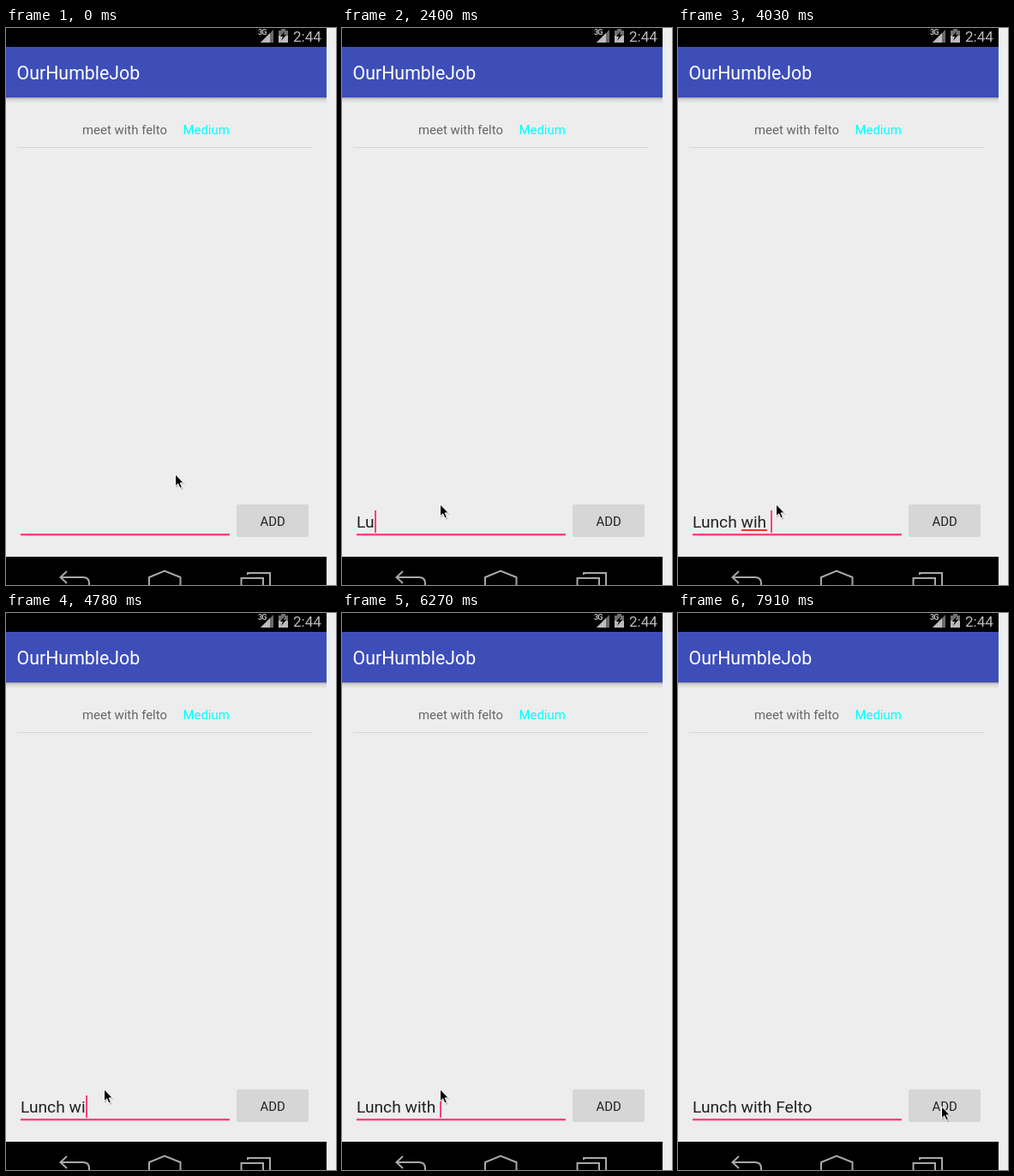
An HTML page that plays this animation: 385x650 px, repeating every 8000 ms.

```html
<!DOCTYPE html>
<html lang="en">
<head>
<meta charset="utf-8">
<title>To-do list</title>
<style>
  html, body { margin: 0; width: 100%; height: 100%; overflow: hidden; background: #efefef; }
  svg { display: block; width: 385px; height: 650px; }
  text { font-family: Roboto, sans-serif; white-space: pre; }
  .item { font-size: 14.93px; }
  .nav { fill: none; stroke: #a8a8a8; stroke-width: 2; }
</style>
</head>
<body>
<svg viewBox="0 0 385 650">
  <defs>
    <linearGradient id="shade" x1="0" y1="0" x2="0" y2="1">
      <stop offset="0" stop-color="#000" stop-opacity=".3"/>
      <stop offset=".35" stop-color="#000" stop-opacity=".1"/>
      <stop offset="1" stop-color="#000" stop-opacity="0"/>
    </linearGradient>
  </defs>

  <rect width="374" height="650" fill="#ededed"/>

  <!-- Status bar -->
  <rect width="374" height="22" fill="#000"/>
  <text x="294" y="8" font-size="9" font-weight="700" fill="#b8b8b8" letter-spacing="-.8">3G</text>
  <path d="M312 2V17H297Z" fill="#686868"/>
  <path d="M308 6V17H297Z" fill="#bcbcbc"/>
  <path d="M321 1h5v2h3v7h-11V3h3Z" fill="#707070"/>
  <path d="M318 9h11v8h-11Z" fill="#bcbcbc"/>
  <path d="M325 4l-5 6h3l-2 5 6-7h-3Z" fill="#000"/>
  <text x="335" y="16" font-size="17.07" fill="#bcbcbc">2:44</text>

  <!-- App bar -->
  <rect y="22" width="374" height="59" fill="#3e4eb8"/>
  <rect y="81" width="374" height="7" fill="url(#shade)"/>
  <text x="12.5" y="60" font-size="21.33" fill="#fff">OurHumbleJob</text>

  <!-- List -->
  <text class="item" x="89" y="124" fill="#666">meet with felto</text>
  <text class="item" x="206.5" y="124" fill="#0ff">Medium</text>
  <rect x="13" y="139" width="344" height="1" fill="#d5d5d5"/>

  <!-- Entry row -->
  <rect x="17" y="590" width="244" height="2.4" fill="#ff4081"/>
  <text id="entry" x="17" y="583" font-size="19.2" fill="#212121"></text>
  <rect id="typo" x="74" y="585" width="30" height="2" fill="#e8392f"/>
  <rect id="caret" y="563" width="2" height="26" fill="#ff4081"/>
  <rect x="269" y="556" width="84" height="38" rx="2" fill="#d6d6d6"/>
  <text class="item" x="296.5" y="580.5" fill="#212121">ADD</text>

  <!-- Navigation bar -->
  <rect y="617" width="374" height="33" fill="#000"/>
  <path class="nav" d="M71 634L63.500 641L71 648M64 641H90Q97 641 97 648V651"/>
  <path class="nav" d="M167 651V641L185 633.500L203.500 641V651"/>
  <path class="nav" d="M274.500 651V642H300V651M282 636H308V651M282 635V638"/>

  <g id="pointer">
    <path d="M1 2V17L4.600 13.700L7 19L9.800 17.800L7.500 12.600H12Z" fill="#000" opacity=".18"/>
    <path d="M.5 .8V14.800L3.700 11.800L6 17L8.400 16L6.100 10.900H10.300Z" fill="#000" stroke="#fff" stroke-width="1"/>
  </g>
</svg>
<script>
const LOOP = 8000;
const $ = id => document.getElementById(id);
const entry = $('entry'), caret = $('caret'), typo = $('typo'), pointer = $('pointer');

// [start ms, value]; each value holds until the next step
const typing = [
  [0, ''], [2250, 'L'], [2400, 'Lu'], [2690, 'Lun'], [2840, 'Lunc'], [2990, 'Lunch'],
  [3290, 'Lunch '], [3440, 'Lunch w'], [3580, 'Lunch wi'], [3880, 'Lunch wih'],
  [4030, 'Lunch wih '], [4630, 'Lunch wih'], [4780, 'Lunch wi'],
  [5230, 'Lunch wiT'], [5380, 'Lunch wiTH'], [5670, 'Lunch wiT'], [5820, 'Lunch wi'],
  [5970, 'Lunch wit'], [6120, 'Lunch with'], [6270, 'Lunch with '],
  [6560, 'Lunch with F'], [6710, 'Lunch with Fe'],
  [7010, 'Lunch with Felt'], [7160, 'Lunch with Felto']
];
const blink = [
  [0, false], [300, true], [750, false], [1200, true], [1800, false],
  [2250, true], [4480, false], [4630, true], [7460, false]
];
const moves = [
  [0, [197, 520]], [1200, [183, 525]], [1350, [135, 545]], [1500, [112, 554]],
  [1650, [113, 554]], [1800, [114, 555]], [7460, [150, 569]],
  [7610, [229, 595]], [7760, [304, 591]], [7910, [307, 575]]
];

const at = (steps, t) => steps.findLast(([start]) => start <= t)[1];
const show = (el, on) => el.setAttribute('visibility', on ? 'visible' : 'hidden');

function draw(t) {
  const words = at(typing, t);
  if (entry.textContent !== words) entry.textContent = words;
  const width = words ? entry.getComputedTextLength() : 0;
  caret.setAttribute('x', Math.round(17 + width));
  show(caret, at(blink, t));
  show(typo, words === 'Lunch wih ');
  pointer.setAttribute('transform', `translate(${at(moves, t)})`);
}

const began = performance.now();
function tick() {
  draw((performance.now() - began) % LOOP);
  requestAnimationFrame(tick);
}
tick();
</script>
</body>
</html>
```
